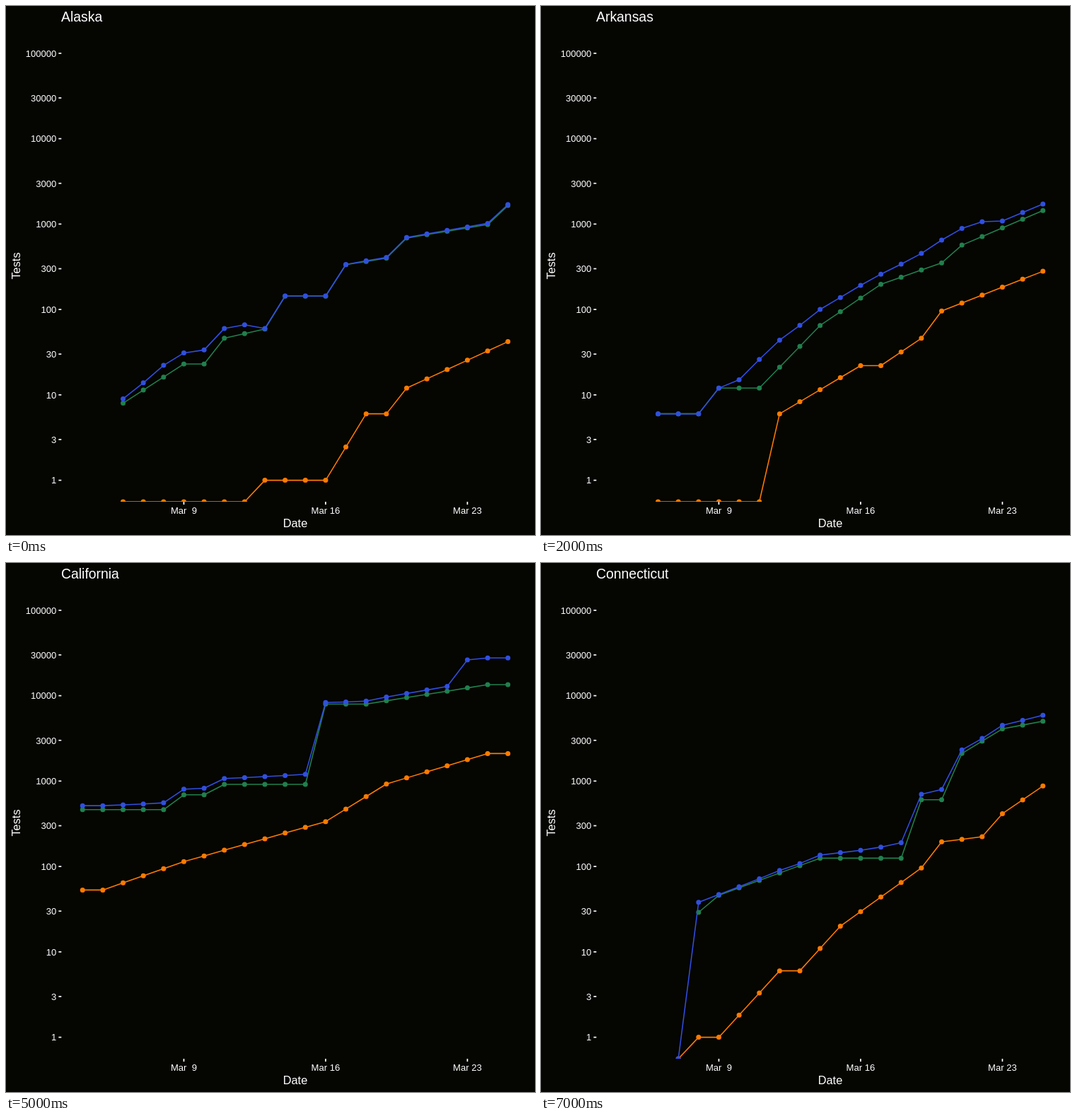
An HTML page that plays this animation: 748 by 748 pixels, repeating every 8 s.

```html
<!DOCTYPE html>
<html lang="en">
<head>
<meta charset="utf-8">
<title>Tests by state</title>
<style>
  html, body { margin: 0; width: 100%; height: 100%; overflow: hidden; background: #050501; }
  svg { display: block; width: 100vw; height: 100vh; }
  text { fill: #fff; font-family: "Liberation Sans", Arial, sans-serif; font-size: 13.07px; white-space: pre; }
  .title { font-size: 19.4px; }
  .name { font-size: 16.33px; text-anchor: middle; }
  .tick { stroke: #fff; stroke-width: 1.7; }
  .line { fill: none; stroke-width: 1.55; stroke-linejoin: round; }
</style>
</head>
<body>
<svg id="stage" viewBox="0 0 748 748">
  <clipPath id="panel"><rect x="78" y="30" width="662" height="671"/></clipPath>
  <text class="name" x="409" y="736.5">Date</text>
  <text class="name" transform="translate(19.7 367.5) rotate(-90)">Tests</text>
</svg>
<script>
const HOLD = 1000;
const DAY = 28.64, LAST_X = 709.7, LAST_DAY = 25;
const BOTTOM = 701, ONE_Y = 670.6, DECADE = 120.75;
const ORANGE = "#ff7a00", GREEN = "#20804d", BLUE = "#304fe0";
const stage = document.getElementById("stage");
const slides = [];

function add(parent, tag, attrs, text) {
  const el = document.createElementNS("http://www.w3.org/2000/svg", tag);
  for (const key in attrs) el.setAttribute(key, attrs[key]);
  if (text) el.textContent = text;
  parent.appendChild(el);
  return el;
}

const dayX = day => LAST_X - (LAST_DAY - day) * DAY;
const valueY = v => v > 0 ? ONE_Y - Math.log10(v) * DECADE : BOTTOM;

function drawAxes() {
  for (let e = 0; e <= 5; e++) {
    for (const m of e < 5 ? [1, 3] : [1]) {
      const v = m * 10 ** e, y = valueY(v);
      add(stage, "line", { class: "tick", x1: 74.4, x2: 78.3, y1: y, y2: y });
      add(stage, "text", { x: 71.3, y: y + 4.8, "text-anchor": "end" }, String(v));
    }
  }
  for (const day of [9, 16, 23]) {
    const x = dayX(day);
    add(stage, "line", { class: "tick", x1: x, x2: x, y1: BOTTOM, y2: BOTTOM + 4 });
    add(stage, "text", { x, y: 718, "text-anchor": "middle" }, "Mar " + String(day).padStart(2, "\u00a0"));
  }
}

// Exponential growth between [day, count] keys; a count holds next to a zero and after the last key.
function countAt(keys, day) {
  const i = keys.findLastIndex(key => key[0] <= day);
  if (i < 0) return 0;
  const [d0, v0] = keys[i];
  const [d1, v1] = keys[i + 1] || [d0 + 1, v0];
  return v0 && v1 ? v0 * (v1 / v0) ** ((day - d0) / (d1 - d0)) : v0;
}

function drawSeries(parent, color, first, count) {
  const points = [];
  for (let day = first; day <= LAST_DAY; day++) points.push([dayX(day), valueY(count(day))]);
  add(parent, "polyline", { class: "line", stroke: color, points: points.join(" ") });
  for (const [cx, cy] of points) add(parent, "circle", { cx, cy, r: 3.5, fill: color });
}

// The total is the sum of positive, negative and pending tests.
function state(name, positive, negative, pending) {
  const slide = add(stage, "g", { visibility: "hidden" });
  add(slide, "text", { class: "title", x: 78, y: 22.2 }, name);
  const plot = add(slide, "g", { "clip-path": "url(#panel)" });
  const total = day => countAt(positive, day) + countAt(negative, day) + countAt(pending, day);
  drawSeries(plot, ORANGE, positive[0][0], day => countAt(positive, day));
  if (negative.length) drawSeries(plot, GREEN, negative[0][0], day => countAt(negative, day));
  drawSeries(plot, BLUE, pending[0][0], total);
  slides.push(slide);
}

drawAxes();

state("Alaska",
  [[6, 0], [13, 1], [16, 1], [18, 6], [19, 6], [20, 12], [25, 42]],
  [[6, 8], [9, 23], [10, 23], [11, 46], [13, 59], [14, 143], [16, 143], [17, 334], [19, 400], [20, 686], [24, 986], [25, 1649]],
  [[6, 1], [8, 6], [11, 14], [13, 0]]);

state("Alabama",
  [[7, 0], [13, 1], [14, 6], [16, 28], [25, 283]],
  [[11, 10], [15, 28], [21, 28], [22, 1464], [25, 2529]],
  [[7, 0], [13, 46], [16, 0]]);

state("Arkansas",
  [[6, 0], [12, 6], [16, 22], [17, 22], [19, 46], [20, 96], [25, 280]],
  [[6, 6], [8, 6], [9, 12], [11, 12], [14, 65], [17, 197], [20, 351], [21, 567], [25, 1437]],
  [[6, 0], [10, 3], [11, 14], [17, 40], [20, 202], [23, 0]]);

state("American Samoa", [[16, 0]], [], [[16, 0]]);

state("Arizona",
  [[4, 2], [5, 2], [7, 5], [9, 5], [11, 9], [15, 12], [18, 28], [23, 265], [25, 450]],
  [[4, 27], [7, 44], [9, 44], [14, 121], [16, 125], [22, 282], [25, 323]],
  [[4, 8], [9, 8], [10, 27], [19, 130], [22, 100], [23, 10]]);

state("California",
  [[4, 53], [5, 53], [9, 114], [16, 335], [19, 924], [24, 2102]],
  [[4, 462], [8, 462], [9, 690], [10, 690], [11, 916], [15, 916], [16, 7981], [18, 7981], [24, 13452]],
  [[4, 0], [23, 12100]]);

state("Colorado",
  [[5, 0], [6, 2], [7, 8], [8, 8], [10, 12], [11, 28], [15, 131], [16, 131], [25, 912]],
  [[5, 19], [6, 46], [7, 55], [8, 104], [10, 142], [13, 523], [14, 609], [16, 627], [18, 1617], [25, 6789]],
  [[5, 21], [7, 69], [8, 0]]);

state("Connecticut",
  [[7, 0], [8, 1], [9, 1], [12, 6], [13, 6], [15, 20], [19, 96], [20, 194], [22, 223], [23, 415], [25, 875]],
  [[8, 29], [9, 46], [14, 125], [18, 125], [19, 604], [20, 604], [21, 2106], [23, 4085], [25, 5023]],
  [[7, 0], [8, 8], [9, 0]]);

function show(time) {
  const now = Math.floor(time / HOLD) % slides.length;
  slides.forEach((slide, i) => slide.setAttribute("visibility", i === now ? "visible" : "hidden"));
}

const start = performance.now();
function tick() {
  show(performance.now() - start);
  requestAnimationFrame(tick);
}
tick();
</script>
</body>
</html>
```
